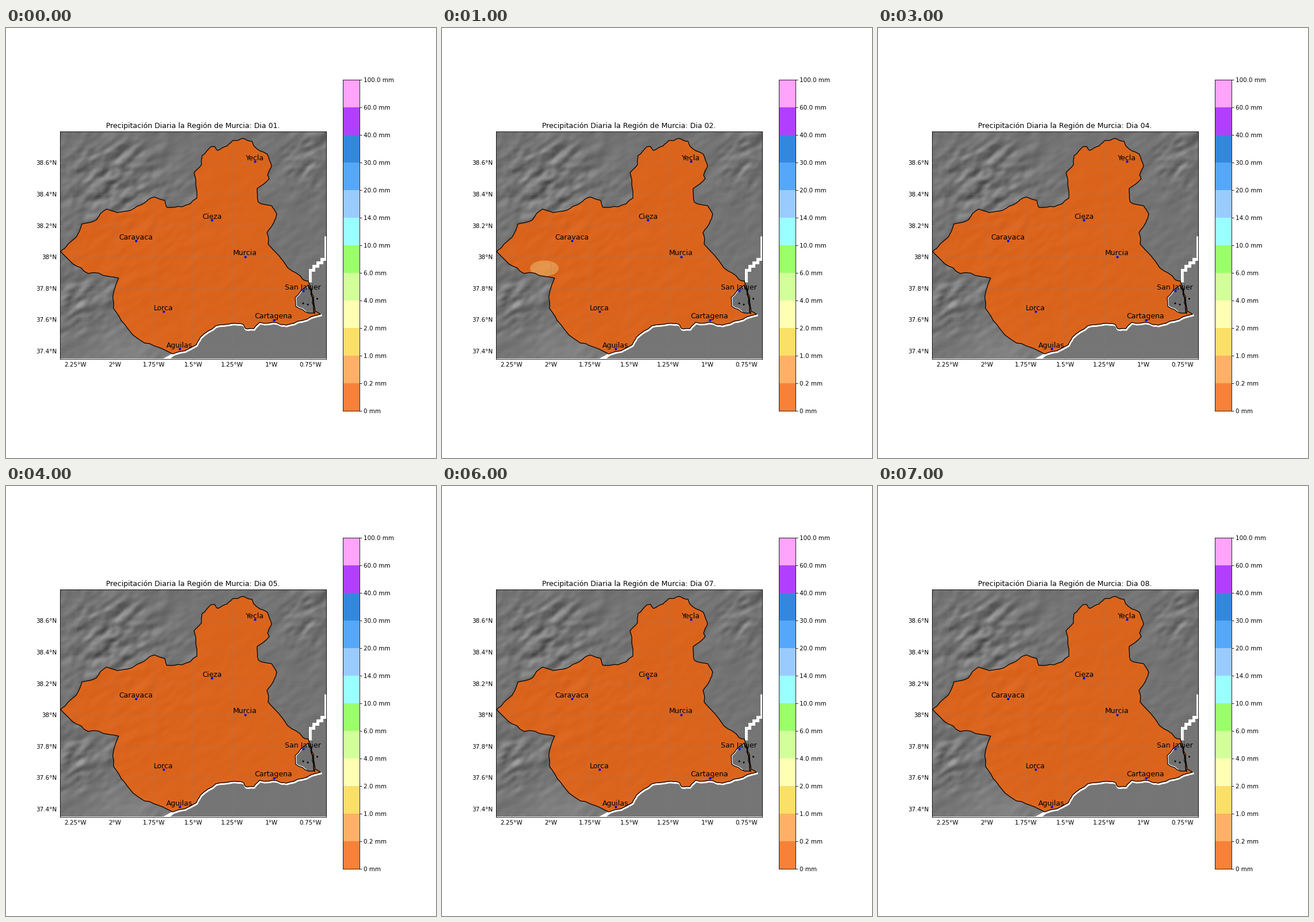
Animation, 748 px wide and 748 px high, one loop 8000 ms. Source, as a matplotlib script:

```python
import numpy as np
import matplotlib.pyplot as plt
from matplotlib.animation import FuncAnimation
from matplotlib.patches import Circle, Ellipse, PathPatch, Polygon
from matplotlib.path import Path

SIZE = 748
LEFT, RIGHT, TOP, BOTTOM = 93.5, 557.26, 179.9, 575.5
DEG = 272.8  # pixels per degree

plt.rcParams["font.family"] = "DejaVu Sans"
rng = np.random.RandomState(4)

LEVELS = "0 0.2 1.0 2.0 4.0 6.0 10.0 14.0 20.0 30.0 40.0 60.0 100.0".split()
BAR = ["#f78139", "#ffb066", "#fadf68", "#ffffb4", "#d3ff9b", "#9bff69",
       "#9affff", "#9acbff", "#55a7fa", "#3388dd", "#b23fff", "#ffa3fb"]

# Region border, clockwise from the western tip, in stage pixels
NORTH = [(95, 389), (107, 377), (122, 364), (132, 341), (157, 334), (175, 315),
         (193, 321), (217, 317), (240, 305), (247, 299), (258, 294), (276, 300),
         (280, 312), (306, 311), (332, 296), (327, 252), (340, 238), (341, 222),
         (356, 207), (363, 206), (368, 213), (385, 205), (394, 196), (412, 192)]
EAST = [(428, 197), (431, 205), (454, 219), (462, 240), (455, 256), (458, 262),
        (437, 279), (439, 303), (462, 309), (471, 324), (466, 338), (454, 356),
        (456, 376), (490, 417), (517, 438), (526, 440)]
COAST = [(527, 444), (535, 467), (538, 493), (547, 498), (515, 509), (487, 517),
         (472, 513), (441, 512), (431, 523), (417, 523), (413, 516), (393, 514),
         (365, 518), (338, 538), (331, 551), (290, 567)]
WEST = [(272, 558), (241, 548), (206, 515), (187, 488), (190, 450), (196, 435),
        (178, 432), (143, 427), (116, 410)]
LAGOON = [(526, 447), (503, 469), (504, 484), (527, 496), (537, 496), (533, 470)]

CITIES = [("Yecla", 433, 232), ("Cieza", 358, 334), ("Caravaca", 225.5, 370),
          ("Murcia", 416, 397.5), ("San Javier", 516.5, 457),
          ("Lorca", 274, 493), ("Cartagena", 465.5, 507.5),
          ("Aguilas", 302, 558)]


def ragged(points, rounds=2, closed=True):
    """Roughen a line by shifting the midpoints of its segments."""
    p = np.array(points, float)
    for _ in range(rounds):
        d = np.roll(p, -1, axis=0) - p
        shift = np.clip(rng.normal(0, .05, (len(p), 1)), -.09, .09)
        mid = p + d / 2 + np.c_[-d[:, 1], d[:, 0]] * shift
        p = np.stack([p, mid], 1).reshape(-1, 2)
        if not closed:
            p = p[:-1]
    return p


def smooth(points):
    """Closed Catmull-Rom curve through the points."""
    b = np.array(points, float)
    a, c, d = (np.roll(b, n, axis=0) for n in (1, -1, -2))
    t = np.linspace(0, 1, 8, endpoint=False)[None, :, None]
    a, b, c, d = (p[:, None] for p in (a, b, c, d))
    curve = b + t / 2 * (c - a + t * (2 * a - 5 * b + 4 * c - d
                                      + t * (3 * (b - c) + d - a)))
    return curve.reshape(-1, 2)


def closed_path(p):
    return Path(np.vstack([p, p[:1]]), closed=True)


def tint(level):
    """Full-strength colour of a level; the bar shows it at 80 % over white."""
    c = np.array([int(BAR[level][i:i + 2], 16) for i in (1, 3, 5)]) / 255
    return np.clip((c - .2) / .8, 0, 1)


def area(level, *points):
    return Polygon(smooth(points), fc=tint(level), ec="none", zorder=2 + .05 * level)


def spot(level, x, y, w, h, angle=0):
    z = 2.3 if level == 0 else 2 + .05 * level
    return Ellipse((x, y), w, h, angle=angle, fc=tint(level), ec="none", zorder=z)


def relief():
    """Grey hillshade: embossed, stretched noise over land, flat sea."""
    rows, cols = 198, 232
    ky, kx = np.meshgrid(np.fft.fftfreq(rows), np.fft.fftfreq(cols), indexing="ij")
    a = np.radians(-28)
    ku, kv = kx * np.cos(a) + ky * np.sin(a), -kx * np.sin(a) + ky * np.cos(a)
    gain = (.004 + (1.9 * ku) ** 2 + (.9 * kv) ** 2) ** -1.1
    gain *= np.exp(-(kx ** 2 + ky ** 2) * 35)
    h = np.fft.ifft2(np.fft.fft2(rng.normal(size=(rows, cols))) * gain).real
    gy, gx = np.gradient(h)
    shade = gx + gy
    shade = np.clip(shade / shade.std(), -2.6, 2.6)

    x, y = np.meshgrid(np.linspace(LEFT, RIGHT, cols), np.linspace(TOP, BOTTOM, rows))
    rough = np.full(x.shape, .15)
    for cx, cy, r, k in [(170, 265, 85, .9), (530, 230, 52, .9),
                         (125, 480, 55, .8), (270, 390, 120, .35)]:
        rough += k * np.exp(-((x - cx) ** 2 + (y - cy) ** 2) / r ** 2)
    grey = 115 + 17 * rough * shade
    grey += 14 * np.exp(-((x - 210) / 70) ** 2 - ((y - 565) / 40) ** 2)
    sea = closed_path(np.array([(560, 362), (541, 410)] + COAST
                               + [(275, 580), (560, 580)], float))
    wet = sea.contains_points(np.c_[x.ravel(), y.ravel()]).reshape(x.shape)
    grey[wet] = 117
    return grey


fig = plt.figure(figsize=(10, 10), dpi=SIZE / 10, facecolor="white")
ax = fig.add_axes([LEFT / SIZE, 1 - BOTTOM / SIZE,
                   (RIGHT - LEFT) / SIZE, (BOTTOM - TOP) / SIZE])

coast = ragged(COAST, closed=False)
outer = np.vstack([ragged(NORTH + EAST, closed=False), coast,
                   ragged(WEST, closed=False)])
lagoon = ragged(LAGOON)
region = Path.make_compound_path(closed_path(outer), closed_path(lagoon))

ground = relief()
look = dict(extent=(LEFT, RIGHT, BOTTOM, TOP), cmap="gray", vmin=0, vmax=255,
            interpolation="bilinear", aspect="auto")
ax.imshow(ground, zorder=0, **look)

# White shore
ax.plot(*(coast[12:] + (1, 2)).T, color="white", lw=3, zorder=1)
ax.plot(*lagoon[:12].T, color="white", lw=3.5, zorder=1)
ax.plot([556, 549, 542, 535, 529, 529], [362, 402, 408, 414, 421, 442],
        drawstyle="steps-pre", color="white", lw=4.8, zorder=1,
        solid_joinstyle="miter", solid_capstyle="butt")
ax.add_patch(Polygon([(272, 576), (290, 566), (301, 563), (285, 576)],
                     fc="white", zorder=1))

# Rain areas of each wet day; they may leave the region and are clipped to it
RAIN = {
    2: [spot(1, 178, 418, 50, 27)],
    6: [area(1, (80, 393), (140, 388), (180, 371), (225, 363), (275, 360),
             (312, 338), (340, 314), (388, 303), (391, 270), (402, 240),
             (406, 211), (445, 203), (380, 150), (80, 250)),
        area(2, (152, 332), (165, 343), (205, 346), (255, 329), (282, 312), (230, 270)),
        area(2, (364, 204), (369, 235), (350, 268), (326, 284), (315, 220)),
        area(3, (165, 316), (190, 331), (225, 322), (263, 318), (283, 298), (220, 280)),
        spot(3, 329, 246, 22, 28),
        spot(4, 250, 298, 42, 25, -12),
        spot(5, 250, 298, 30, 16, -15),
        spot(0, 161, 351, 18, 14), spot(0, 272, 331, 19, 23),
        spot(0, 328, 310, 21, 20)],
}
ax.add_patch(PathPatch(region, fc=tint(0), ec="none", zorder=2))
for parts in RAIN.values():
    for part in parts:
        ax.add_patch(part)
        part.set_clip_path(region, ax.transData)

veil = ax.imshow(ground, alpha=.2, zorder=2.5, **look)
veil.set_clip_path(region, ax.transData)

ax.add_patch(PathPatch(region, fc="none", ec="black", lw=1.2, zorder=4))
t = np.linspace(0, 1, 14)
ax.plot(530 + 7 * t + 1.5 * np.sin(19 * t), 452 + 45 * t, color="black", lw=1.2, zorder=4)
for x, y in [(517, 479), (525, 481), (534, 473), (541.5, 471)]:
    ax.add_patch(Circle((x, y), 1.5, fc="black", zorder=4))

for name, x, y in CITIES:
    ax.plot(x, y, "o", color="blue", ms=4, mew=0, zorder=5)
    ax.text(x, y - 2.3, name, fontsize=12, ha="center", va="baseline", zorder=6)

lons = np.arange(-2.25, -.7, .25)
lats = np.arange(37.4, 38.7, .2)
ax.set_xticks(LEFT + (lons + 2.35) * DEG, [f"{-v:g}°W" for v in lons])
ax.set_yticks(BOTTOM - (lats - 37.35) * DEG, [f"{round(v, 1):g}°N" for v in lats])
ax.tick_params(length=0, pad=5, labelsize=10)
ax.set_axisbelow(False)
ax.grid(color="gray", ls="--", lw=.8, alpha=.5, zorder=3)
ax.set_xlim(LEFT, RIGHT)
ax.set_ylim(BOTTOM, TOP)
title = ax.set_title("", fontsize=12, pad=6)

bar = fig.add_axes([.78375, .11, .0385, .77])
bar.barh(np.arange(12), 1, height=1, align="edge", color=BAR)
bar.set_xlim(0, 1)
bar.set_ylim(0, 12)
bar.set_xticks([])
bar.yaxis.tick_right()
bar.set_yticks(range(13), [v + " mm" for v in LEVELS])
bar.tick_params(labelsize=10)


def update(i):
    day = i + 1
    title.set_text(f"Precipitación Diaria la Región de Murcia: Dia {day:02d}.")
    for wet_day, parts in RAIN.items():
        for part in parts:
            part.set_visible(wet_day == day)
    return []


anim = FuncAnimation(fig, update, frames=8, interval=1000, repeat=True,
                     repeat_delay=0, init_func=lambda: update(0))
plt.show()
```
